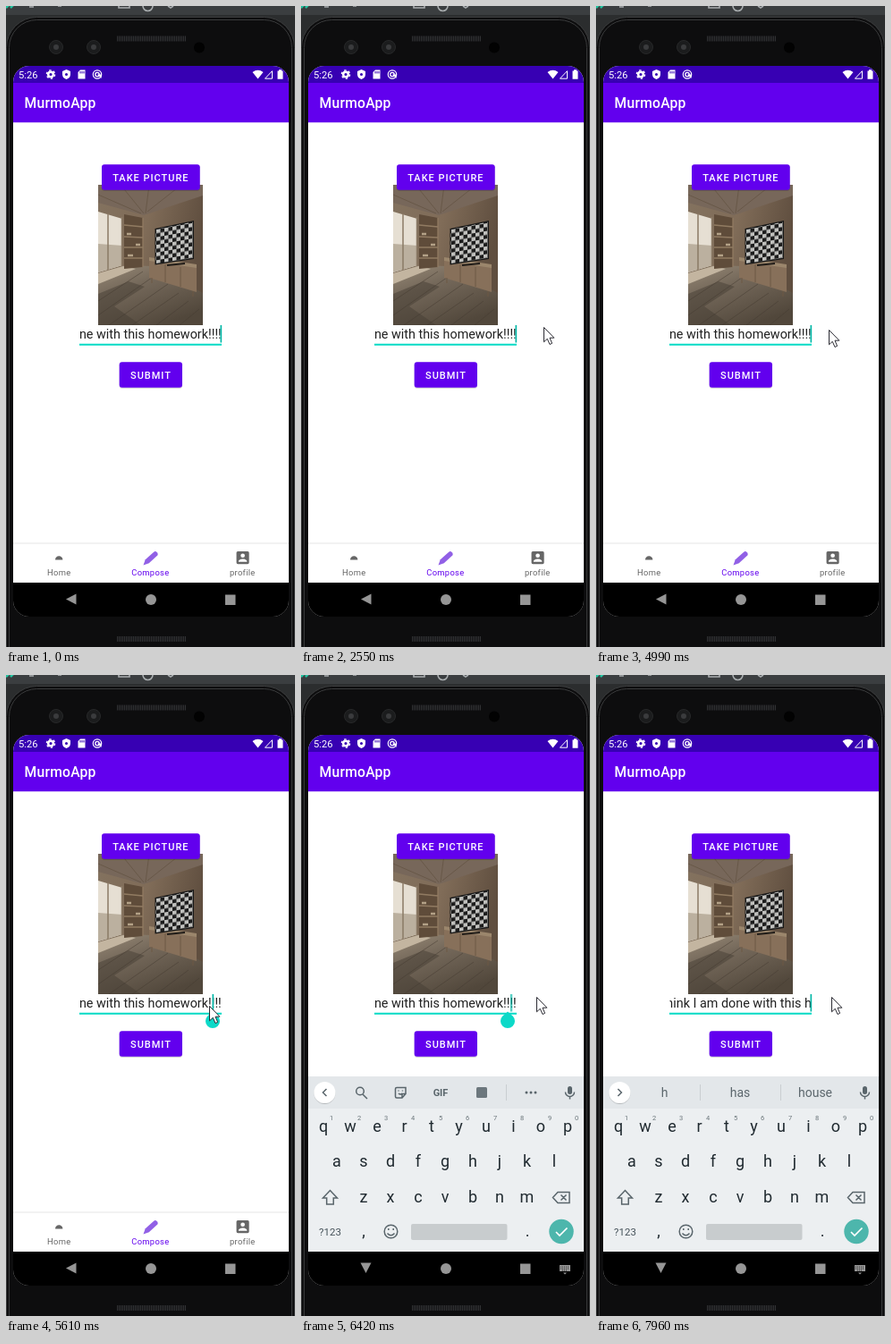
Write an HTML page that moves like this. It is 323x717 px and loops after 8 s.

```html
<!DOCTYPE html>
<html lang="en">
<head>
<meta charset="utf-8">
<title>Compose screen</title>
<style>
html, body { margin: 0; width: 100%; height: 100%; overflow: hidden; background: #2b2d2e; }
svg { display: block; width: 323px; height: 717px; font-family: Roboto, sans-serif; }
.mid { text-anchor: middle; }
.btn { font-weight: 500; font-size: 11px; letter-spacing: .98px; fill: #fff; }
.tab { font-size: 9.4px; letter-spacing: .31px; }
.key { font-size: 18px; fill: #202a30; }
.line { fill: none; stroke: #59656b; stroke-width: 1.5; }
.mesh { stroke: #303133; stroke-width: 6; stroke-dasharray: 1.2 .8; }

#cursor, #caret, #drop, #board, #back, #hide, #tools, #hints, #field tspan {
  animation: 8s step-end infinite;
}
#cursor { animation-name: move; }
#caret { animation-name: blink; }
#drop { animation-name: drop; }
#board { animation-name: rise; }
#back { animation-name: turn; transform-origin: 72.5px 663.5px; }
#hide { animation-name: show; }
#tools { animation-name: tools; }
#hints { animation-name: hints; }
#field .d1 { animation-name: d1; }
#field .d2 { animation-name: d2; }
#field .d3 { animation-name: d3; }
#field .d4 { animation-name: d4; }
#field .d5 { animation-name: d5; }
#field .d6 { animation-name: d6; }
#field .d7 { animation-name: d7; }

@keyframes move {
  0% { transform: translate(293px, 632px); opacity: 0; }
  .875% { transform: translate(293px, 632px); opacity: 1; }
  1.75% { transform: translate(291px, 606px); }
  2.75% { transform: translate(283px, 556px); }
  3.625% { transform: translate(268px, 500px); }
  4.375% { transform: translate(250px, 450px); }
  5.25% { transform: translate(236px, 412px); }
  6.125% { transform: translate(227px, 388px); }
  7.75% { transform: translate(223px, 377px); }
  10.25% { transform: translate(223px, 378px); }
  11.125% { transform: translate(225px, 376px); }
  17.75% { transform: translate(226px, 375px); }
  19.375% { transform: translate(226px, 374px); }
  25.125% { transform: translate(218px, 391px); }
  26% { transform: translate(226px, 388px); }
  27% { transform: translate(244px, 376px); }
  28.5% { transform: translate(262px, 364px); }
  29.375% { transform: translate(271px, 359px); }
  62.375% { transform: translate(260px, 362px); }
  63.25% { transform: translate(235px, 375px); }
  64% { transform: translate(212px, 383px); }
  64.875% { transform: translate(201px, 383px); }
  66.75% { transform: translate(214px, 377px); }
  67.625% { transform: translate(227px, 370px); }
  70.25% { transform: translate(240px, 366px); }
  71.875% { transform: translate(252px, 364px); }
  72.75% { transform: translate(259px, 362px); }
  73.625%, 100% { transform: translate(263px, 360px); opacity: 1; }
}
@keyframes blink {
  0% { opacity: 1; transform: none; }
  .875% { opacity: 0; }
  7.75% { opacity: .5; }
  13.625% { opacity: 0; }
  19.375% { opacity: .5; }
  25.125% { opacity: 0; }
  31.875% { opacity: 1; }
  38.5% { opacity: 0; }
  44.25% { opacity: 1; }
  50.875% { opacity: 0; }
  56.625% { opacity: 1; }
  63.25% { opacity: 0; transform: none; }
  68.5% { opacity: 1; transform: translateX(-9px); }
  76.125% { opacity: 0; transform: translateX(-9px); }
  80.25% { opacity: 1; transform: translateX(-5.5px); }
  82% { transform: translateX(-2px); }
  84.5%, 100% { opacity: 1; transform: none; }
}
@keyframes drop { 0% { opacity: 0; } 68.5% { opacity: 1; } 82%, 100% { opacity: 0; } }
@keyframes rise {
  0% { transform: translateY(26px); opacity: 0; }
  71% { transform: translateY(26px); opacity: .35; }
  71.875% { transform: translateY(23px); opacity: .85; }
  72.75% { transform: translateY(5px); opacity: 1; }
  73.625%, 100% { transform: none; opacity: 1; }
}
@keyframes turn {
  0% { transform: none; }
  71% { transform: rotate(90deg); }
  71.875% { transform: rotate(188deg); }
  72.75% { transform: rotate(255deg); }
  73.625%, 100% { transform: rotate(270deg); }
}
@keyframes show { 0% { opacity: 0; } 71.875% { opacity: .5; } 72.75%, 100% { opacity: 1; } }
@keyframes tools { 0% { opacity: 1; } 99.5%, 100% { opacity: 0; } }
@keyframes hints { 0% { opacity: 0; } 99.5%, 100% { opacity: 1; } }
@keyframes d1 { 88.625%, 100% { font-size: 0; } }
@keyframes d2 { 90.25%, 100% { font-size: 0; } }
@keyframes d3 { 96%, 100% { font-size: 0; } }
@keyframes d4 { 96.875%, 100% { font-size: 0; } }
@keyframes d5 { 97.75%, 100% { font-size: 0; } }
@keyframes d6 { 98.625%, 100% { font-size: 0; } }
@keyframes d7 { 99.5%, 100% { font-size: 0; } }
</style>
</head>
<body>
<svg viewBox="0 0 323 717">
  <defs>
    <clipPath id="screen"><rect x="8" y="67" width="308" height="616" rx="18"/></clipPath>
    <clipPath id="entry"><rect x="82.500" y="355" width="159" height="24"/></clipPath>
    <clipPath id="photo"><rect x="103" y="200" width="117" height="157"/></clipPath>
    <linearGradient id="wall" x2="1" y2=".3">
      <stop stop-color="#83725f"/><stop offset=".5" stop-color="#806c58"/><stop offset="1" stop-color="#5f4e3f"/>
    </linearGradient>
    <linearGradient id="floor" x2=".6" y2="1">
      <stop stop-color="#988a77"/><stop offset=".4" stop-color="#74685a"/><stop offset="1" stop-color="#51473b"/>
    </linearGradient>
    <pattern id="check" width="9" height="8.600" patternUnits="userSpaceOnUse" patternTransform="translate(168 250) skewY(-10)">
      <path fill="#1c1c1c" d="M0 0h9v8.600H0z"/><path fill="#c0c0bd" d="M0 0h4.500v4.300H0zM4.500 4.300H9v4.300H4.500z"/>
    </pattern>
    <filter id="soft" x="-20%" y="-20%" width="140%" height="160%">
      <feDropShadow dx="0" dy=".8" stdDeviation=".7" flood-opacity=".25"/>
    </filter>
  </defs>

  <!-- desktop strip -->
  <path fill="#3b3e40" d="M0 0h323v10H0z"/>
  <g fill="none" stroke="#a9adaf" stroke-width="1.6">
    <path stroke="#20c5a0" stroke-width="2.5" d="M0 2l3-3M5 2l3-3"/>
    <path d="M26 1h5M58 0h4M126 0v2h12V0M153 0a5.500 5.500 0 0 0 11 0M181 0l3 2 3-2"/>
  </g>

  <!-- phone body -->
  <rect x=".5" y="12.500" width="322" height="740" rx="34" fill="#0d0d0e" stroke="#3c3d3e"/>
  <rect x="3.500" y="15.500" width="316" height="740" rx="31" fill="none" stroke="#3a3b3c"/>
  <path class="mesh" d="M124 36.500h77M124 708h77"/>
  <g fill="#1b1c1d" stroke="#28292a">
    <circle cx="56" cy="46" r="7.500"/><circle cx="98" cy="46" r="7.500"/>
  </g>
  <g fill="#3a3b3d"><circle cx="56" cy="46" r="3"/><circle cx="98" cy="46" r="3"/></g>
  <circle cx="216" cy="46.500" r="6" fill="#020202"/>

  <g clip-path="url(#screen)">
    <path fill="#fff" d="M8 67h308v616H8z"/>
    <path fill="#3700b3" d="M8 67h308v19H8z"/>
    <path fill="#6200ee" d="M8 86h308v44.300H8z"/>
    <text x="14" y="81" font-size="11.200" fill="#fff">5:26</text>
    <g fill="#fff">
      <circle cx="50" cy="76.500" r="2.800" fill="none" stroke="#fff" stroke-width="2.400"/>
      <circle cx="50" cy="76.500" r="4.600" fill="none" stroke="#fff" stroke-width="1.400" stroke-dasharray="2.410"/>
      <path d="M67.500 71l4.500 2v3.500q0 4-4.500 5.500-4.500-1.500-4.500-5.500V73zM83 71.500h5.500v10h-8V74z"/>
      <circle cx="67.500" cy="76.500" r="1.500" fill="#3700b3"/>
      <path stroke="#3700b3" d="M83 73v2.500M85 73v2.500M87 73v2.500"/>
      <circle cx="102" cy="76.500" r="4.700" fill="none" stroke="#fff" stroke-width="1.200"/>
      <circle cx="102" cy="76.500" r="2.200" fill="none" stroke="#fff" stroke-width="1.300"/>
      <path d="M102 76.500h4.500v4.500z"/>
      <path d="M275.500 74q6-4.500 12 0l-6 7.500zM303.500 72.500h1.500v-1.200h3v1.200h1.500v9.300h-6z"/>
      <path fill="none" stroke="#fff" d="M289.500 81.200h8v-8.500z"/>
    </g>
    <text x="20.600" y="114" font-size="15.700" font-weight="500" letter-spacing=".2" fill="#fff">MurmoApp</text>

    <!-- room photo -->
    <g clip-path="url(#photo)">
      <path fill="url(#wall)" d="M103 200h117v157H103z"/>
      <path fill="#77675a" d="M103 200h117v12l-66 22-51-14z"/>
      <path stroke="#685848" fill="none" d="M103 211l48 21M128 200l26 32M160 200l-4 32M196 200l-38 30"/>
      <path fill="#e6dfd3" d="M103 230l27 8v52l-27 8z"/>
      <path fill="#bbb09f" d="M103 266l27 2v22l-27 8z"/>
      <path stroke="#8b7a66" stroke-width="1.500" d="M114 232v64M129.500 236v56"/>
      <path fill="url(#floor)" d="M103 299l30-9 30 1 57 30v36H103z"/>
      <path fill="#c3b5a0" d="M103 299l28-8 14 3-42 17z"/>
      <path fill="#473e34" fill-opacity=".5" d="M103 322l34-14 18 6-34 22 30 21h-48z"/>
      <path stroke="#453b31" stroke-opacity=".5" fill="none" d="M103 330l50-33M103 346l64-45M115 357l66-46M141 357l52-36M168 357l36-27M194 357l22-18"/>
      <path fill="#5f4c3a" d="M132 233l21 4v55l-21 2z"/>
      <path stroke="#917b62" stroke-width="1.300" fill="none" d="M132 245l21 2M132 258l21 1M132 270h21M132 282h21M153 237v55"/>
      <path stroke="#b3a187" stroke-width="2.500" d="M135 255h5M145 267h5M136 279h6"/>
      <path fill="#9b866c" d="M160 281l53 8v5l-53-8z"/>
      <path fill="#87705a" d="M160 285l53 8v27l-53-16z"/>
      <path stroke="#6d5845" d="M178 289v20M195 292v22M163 304v6M209 319v6"/>
      <path fill="#171717" d="M166.500 249l43.500-9v43l-43.500 6.500z"/>
      <path fill="url(#check)" d="M167.500 250l41.500-8.500v40.500l-41.500 6z"/>
      <path stroke="#201c18" stroke-width="2" d="M180 290l20-2"/>
    </g>

    <g fill="#6200ee" filter="url(#soft)">
      <rect x="107" y="177.300" width="109.700" height="28.500" rx="3"/>
      <rect x="126.700" y="398.300" width="70.300" height="28.500" rx="3"/>
    </g>
    <text class="btn mid" x="161.900" y="196">TAKE PICTURE</text>
    <text class="btn mid" x="162" y="417">SUBMIT</text>

    <!-- text field -->
    <path fill="#03dac5" d="M82 377.700h159v2H82z"/>
    <g clip-path="url(#entry)">
      <text id="field" x="240.800" y="372" font-size="14.370" text-anchor="end" fill="#212121">I think I am done with this h<tspan class="d7">om</tspan><tspan class="d6">ew</tspan><tspan class="d5">or</tspan><tspan class="d4">k!</tspan><tspan class="d3">!</tspan><tspan class="d2">!</tspan><tspan class="d1">!</tspan></text>
    </g>
    <path id="caret" fill="#06b8a8" d="M239.500 357h1.700v19.500h-1.700z"/>
    <path id="drop" fill="#0cd9c8" d="M231 376.500l5.700 5a8 8 0 1 1-11.400 0z"/>

    <!-- bottom tabs -->
    <path fill="#e6e6e6" d="M8 600.500h308v1H8z"/>
    <path fill="#666" d="M55 619.500a4.200 4.200 0 0 1 8.400 0zM55.700 614l1.300 2M62.700 614l-1.300 2"/>
    <path fill="#9160e6" d="M153.500 625.500l2.200-6.300 9.500-8.500q1.800-1.500 3.600.5t.5 3.300l-9.500 8.700z"/>
    <path fill="#666" fill-rule="evenodd" transform="translate(255.200 607.700) scale(.784)" d="M3 5v14a2 2 0 0 0 2 2h14a2 2 0 0 0 2-2V5a2 2 0 0 0-2-2H5a2 2 0 0 0-2 2zm12 4a3 3 0 1 1-6 0 3 3 0 0 1 6 0zm-9 8c0-2 4-3.100 6-3.100s6 1.100 6 3.100v1H6z"/>
    <g class="tab mid" fill="#666">
      <text x="59.300" y="637">Home</text>
      <text x="161.400" y="637" fill="#6200ee">Compose</text>
      <text x="264.300" y="637">profile</text>
    </g>
    <path d="M8 645h308v38H8z"/>

    <!-- keyboard -->
    <g id="board">
      <path fill="#eceff1" d="M8 449h308v196H8z"/>
      <path fill="#e3e7ea" d="M8 449h308v36H8z"/>
      <circle cx="26.500" cy="467" r="12" fill="#fff" filter="url(#soft)"/>
      <g id="tools">
        <path class="line" d="M28.500 463l-4 4 4 4"/>
        <circle class="line" cx="66" cy="465.500" r="4.300"/>
        <path class="line" stroke-width="2" d="M69 469l5 5"/>
        <path class="line" d="M107 461.500h10v7l-4 4.500h-6q-1.500 0-1.500-1.500V463q0-1.500 1.500-1.500M117 468.500h-4v4M109 468q2 2 4 0M109 464.500v1M113.500 464.500v1"/>
        <text class="mid" x="156" y="471" font-size="11" font-weight="700" fill="#59656b">GIF</text>
        <rect x="196" y="461" width="12" height="12" rx="1.500" fill="#6c777d"/>
        <path stroke="#c9ced1" d="M229.500 458v18"/>
        <g fill="#59656b"><circle cx="252" cy="467" r="1.500"/><circle cx="257" cy="467" r="1.500"/><circle cx="262" cy="467" r="1.500"/></g>
      </g>
      <g id="hints">
        <path class="line" d="M24.500 463l4 4-4 4"/>
        <path stroke="#c9ced1" d="M116.500 458v18M206.500 458v18"/>
        <g class="mid" font-size="14" fill="#5c676d">
          <text x="76.500" y="472">h</text><text x="161" y="472">has</text><text x="245" y="472">house</text>
        </g>
      </g>
      <rect x="298" y="460" width="5" height="9" rx="2.500" fill="#59656b"/>
      <path class="line" stroke-width="1.300" d="M295.500 466.500a5 5 0 0 0 10 0M300.500 471.500v3"/>

      <g class="key mid">
        <text x="25 55 85 115.500 146 176.500 207 237.500 268 298" y="510.500">qwertyuiop</text>
        <text x="40 70 100 131 161 192 222 252.500 283" y="550">asdfghjkl</text>
        <text x="70 100 131 161 192 222 252.500" y="589.500">zxcvbnm</text>
        <text x="70 253" y="628">,.</text>
      </g>
      <text class="mid" x="34 65 95 125 156 186 217 247 278 308" y="498" font-size="7.500" fill="#6a757a">1234567890</text>
      <text class="mid" x="32.500" y="627" font-size="11.500" fill="#46525a">?123</text>
      <path class="line" d="M32.500 576.500l8 8.500h-4.200v7h-7.600v-7h-4.200z"/>
      <path class="line" d="M287 578.500h13v12h-13l-5.500-6zM290.500 581.500l6 6M296.500 581.500l-6 6"/>
      <circle class="line" cx="100.500" cy="622.500" r="7.300"/>
      <path class="line" d="M96.500 624.500q4 4.500 8 0M97.800 619v2M103.200 619v2"/>
      <rect x="123" y="614" width="107.500" height="18" rx="2" fill="#c8ccce"/>
      <circle cx="291" cy="622.500" r="13.700" fill="#4db6ac"/>
      <path fill="none" stroke="#fff" stroke-width="1.700" d="M285 623l4 4 8.500-8.500"/>
    </g>

    <!-- system bar -->
    <path fill-opacity=".3" d="M8 645h308v38H8z"/>
    <g fill="#fff" fill-opacity=".59">
      <path id="back" d="M78.500 657.500v12l-11.500-6z"/>
      <circle cx="162" cy="664" r="6"/>
      <path d="M245 658.500h11.500V670H245z"/>
      <g id="hide">
        <path d="M289 660h12v7h-12zM293 668.500h4l-2 2z"/>
        <path stroke="#000" stroke-opacity=".7" stroke-dasharray="1 1" d="M290 662h10M290 664h10M292 666h6"/>
      </g>
    </g>
  </g>

  <g id="cursor">
    <path fill="#fff" stroke="#2b2b33" stroke-linejoin="round" d="M.5.500v16.300l3.800-3.500 2.700 6.200 2.600-1.200L7 12.200h4.900z"/>
  </g>
</svg>
</body>
</html>
```
